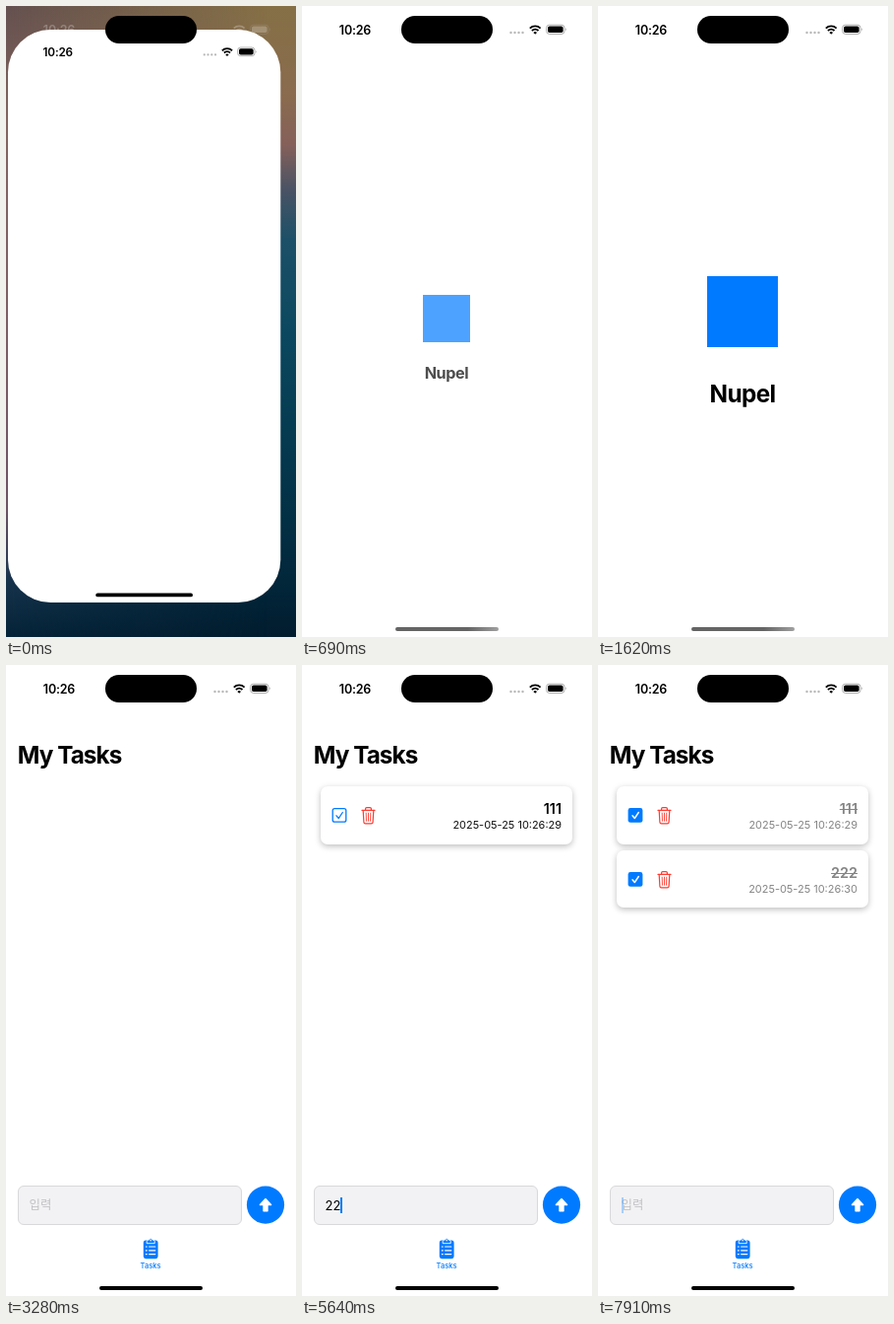
Animation, 295 px wide and 640 px high, one loop 8 s. Source, as an HTML page:

```html
<!DOCTYPE html>
<html lang="ko">
<head>
<meta charset="utf-8">
<title>My Tasks</title>
<style>
  :root { --blue: #007aff; }
  html, body { margin: 0; width: 100%; height: 100%; overflow: hidden; }
  body { position: relative; font-family: Inter, "Noto Sans CJK KR", "Noto Sans CJK", sans-serif; color: #000; }
  body *, body *::before { position: absolute; box-sizing: border-box; }
  svg { left: 0; top: 0; overflow: visible; }
  #stage { left: 0; top: 0; width: 295px; height: 640px; overflow: hidden; }

  .wall { inset: 0; background: linear-gradient(#857046, #8a6b4e 14%, #85605a 22%, #4a5364 29%, #1c5068 37%, #0b485f 52%, #04374d 72%, #02283c 90%, #021c2e); }
  .wall::before { content: ""; inset: 0; background: linear-gradient(#64504f, #83645f 18%, #7c5c64 55%, #6c5264 80%, #16334c 91%, #042338);
    mask-image: linear-gradient(to right, #000, transparent 90%); -webkit-mask-image: linear-gradient(to right, #000, transparent 90%); }
  .ghost { color: #fff; opacity: .25; }

  #app { left: 0; top: 0; width: 295px; height: 640px; background: #fff; overflow: hidden; transform-origin: 0 0; }
  #home { left: 95px; bottom: 6px; width: 105px; height: 3.7px; border-radius: 2px; }
  .island { left: 101px; top: 10px; width: 92.5px; height: 27.5px; border-radius: 14px; background: #000; }

  #splash { inset: 0; transform-origin: 147px 331px; }
  .mark { left: 111px; top: 274px; width: 72px; height: 72px; background: var(--blue); }
  .name { left: 47px; top: 378px; width: 200px; line-height: 30px; text-align: center; font-size: 24.3px; font-weight: 700; letter-spacing: -.6px; }

  #tasks { inset: 0; }
  h1 { left: 11.8px; top: 76.4px; margin: 0; font-size: 24.3px; line-height: 30px; font-weight: 700; letter-spacing: -.95px; white-space: nowrap; }

  .card { left: 19px; width: 256px; height: 58.5px; border-radius: 7px; background: #fff; box-shadow: 0 2px 6px rgba(0, 0, 0, .26); }
  .card b, .card time { right: 11px; white-space: nowrap; }
  .card b { top: 13px; font-size: 14.4px; line-height: 20px; font-weight: 600; }
  .card time { top: 32.2px; font-size: 10.95px; line-height: 15px; color: #111; }
  .card .on { display: none; }
  .done b, .done time { color: #858585; }
  .done b { text-decoration: line-through 1.4px; }
  .done .on { display: inline; }
  .done .off { display: none; }

  .field { left: 11.5px; top: 527.6px; width: 228px; height: 40px; border: 1px solid #d9d9dc; border-radius: 6px; background: #f2f2f4; font-size: 13px; line-height: 38px; }
  .field span { left: 11px; top: 0; white-space: nowrap; }
  #hint { color: #c2c2c5; font-size: 12.4px; }
  .field #typed { position: static; }
  #caret { right: -2px; top: 11.4px; width: 2px; height: 16px; background: var(--blue); }
  .tab { left: 97px; top: 604px; width: 100px; line-height: 11px; font-size: 7.5px; font-weight: 500; text-align: center; color: var(--blue); }
</style>
</head>
<body>
<div id="stage">
  <div class="wall"></div>
  <svg class="ghost" width="295" height="50"><use href="#bar"/></svg>

  <div id="app">
    <svg width="295" height="50">
      <g id="bar" fill="currentColor">
        <text x="54" y="28.5" font-size="12.5" font-weight="600" text-anchor="middle" letter-spacing="-.2">10:26</text>
        <path d="M212.5 27h12.1" stroke="#b8b8b8" stroke-width="2.4" stroke-linecap="round" stroke-dasharray="0 4"/>
        <g fill="none" stroke="currentColor" stroke-width="1.9">
          <path d="M231.8 22.6a7.7 7.7 0 0 1 10.8 0M233.9 25a4.7 4.7 0 0 1 6.6 0"/>
        </g>
        <path d="M237.2 28.8l-1.8-1.9a2.6 2.6 0 0 1 3.6 0z"/>
        <rect x="248.6" y="19.2" width="18.4" height="9.2" rx="3" fill="none" stroke="#aaa"/>
        <rect x="250" y="20.6" width="15.6" height="6.4" rx="1.8"/>
        <path d="M268 22.3q1.8 1.5 0 3z" fill="#aaa"/>
      </g>
    </svg>

    <div id="splash">
      <div class="mark"></div>
      <div class="name">Nupel</div>
    </div>

    <div id="tasks">
      <h1>My Tasks</h1>
      <div id="list"></div>
      <div class="field">
        <span id="hint">입력</span>
        <span><span id="typed"></span><i id="caret"></i></span>
      </div>
      <svg width="295" height="640">
        <g id="send">
          <circle cx="264" cy="547.6" r="19.1" fill="#007aff"/>
          <path d="M264 541.6l5.6 6h-3.6v6.2h-4v-6.2h-3.6z" fill="#fff" stroke="#fff" stroke-width="1.4" stroke-linejoin="round"/>
        </g>
        <g transform="translate(0 -.6)">
          <rect x="139.8" y="584" width="14.8" height="18.8" rx="2.4" fill="#007aff"/>
          <path d="M143.2 587.3v-2q0-1.5 1.5-1.5h.6a2 2 0 0 1 3.8 0h.6q1.5 0 1.5 1.5v2z" fill="#007aff" stroke="#fff" stroke-width=".9"/>
          <circle cx="147.2" cy="584.3" r=".8" fill="#fff"/>
          <path d="M142.3 590.6h1M142.3 594.4h1M142.3 598.2h1M145.6 590.6h6.2M145.6 594.4h6.2M145.6 598.2h6.2" stroke="#fff" stroke-width="1.2" stroke-linecap="round"/>
        </g>
      </svg>
      <div class="tab">Tasks</div>
    </div>
    <div id="home"></div>
  </div>
  <div class="island"></div>
</div>

<script>
const LOOP = 8000;
const OPENED = 560, LOGO = 560, LOGO_END = 1620, MAIN = 3280;

// Bursts of motion advance in even steps: [start, end, count]
const BURSTS = [[120, 890, 8], [1010, 1620, 7], [4900, 5430, 6], [6200, 6860, 7]];
const PRESSES = [4900, 6200];

const TASKS = [
  { text: '111', date: '2025-05-25 10:26:29', added: 5010, done: 7140 },
  { text: '222', date: '2025-05-25 10:26:30', added: 6310, done: 7780 }
];
const TYPING = [[0, ''], [4290, '11'], [4680, '111'], [5010, ''], [5640, '22'], [5880, '222'], [6310, '']];
const CARET = [[0, 0], [4110, 1], [5330, .5], [5430, 0], [5640, 1], [6750, .5], [6860, 0],
  [7140, .5], [7250, 1], [7780, .6], [7910, .3]];

const $ = id => document.getElementById(id);
const clamp = x => Math.min(1, Math.max(0, x));
const at = (track, t) => track.filter(k => k[0] <= t).pop()[1];

function snap(t) {
  const burst = BURSTS.filter(b => b[0] <= t).pop();
  if (!burst) return 0;
  const [start, end, count] = burst;
  const step = (end - start) / (count - 1);
  const n = Math.floor((t - start) / step + 1e-6);
  return start + Math.min(n, count - 1) * step;
}

function addCard(task, i) {
  const card = document.createElement('div');
  card.className = 'card';
  card.style.top = 123 + i * 64.5 + 'px';
  card.innerHTML = `
    <svg width="60" height="58" fill="none" stroke-linecap="round" stroke-linejoin="round">
      <g transform="translate(0 -.6)">
        <g class="off" stroke="#007aff" stroke-width="1.3">
          <rect x="12.2" y="23.2" width="13.6" height="13.6" rx="2"/><path d="M16 30.4l2.3 2.7 4-6"/>
        </g>
        <g class="on">
          <rect x="11.6" y="22.6" width="14.8" height="14.8" rx="2.4" fill="#007aff"/>
          <path d="M16 30.4l2.3 2.7 4-6" stroke="#fff" stroke-width="1.4"/>
        </g>
      </g>
      <g stroke="#ff3b30" stroke-width="1.2">
        <path d="M42 24.4h13M45.6 24v-1.2q0-1.2 1.2-1.2h3.4q1.2 0 1.2 1.2V24M43.2 24.6l.7 11.8q.1 1.5 1.6 1.5h6q1.5 0 1.6-1.5l.7-11.8"/>
        <path d="M46.2 27.2l.3 8M48.5 27.2v8M50.8 27.2l-.3 8" stroke-width=".9"/>
      </g>
    </svg>
    <b>${task.text}</b><time>${task.date}</time>`;
  $('list').append(card);
  task.card = card;
}

function drawWindow(t) {
  const rest = t < OPENED ? Math.exp(-t / 120) : 0;
  const app = $('app').style;
  app.transform = rest ? `translate(${2 * rest}px, ${24 * rest}px) scale(${1 - .06 * rest})` : 'none';
  app.height = 640 - 22 * rest + 'px';
  app.borderRadius = 46 * rest + 'px';
}

function drawSplash(t) {
  const grow = clamp((t - LOGO) / (LOGO_END - LOGO)) ** 2;
  const shown = clamp((t - 400) / 240);
  $('splash').style.opacity = shown * (.69 + .31 * grow);
  $('splash').style.transform = `scale(${.663 + .337 * grow})`;
}

function drawTasks(t, held) {
  for (const task of TASKS) {
    task.card.style.display = t >= task.added ? '' : 'none';
    task.card.classList.toggle('done', t >= task.done);
  }
  const text = at(TYPING, t);
  $('typed').textContent = text;
  $('hint').style.display = text ? 'none' : '';
  $('caret').style.opacity = at(CARET, t);
  const press = PRESSES.filter(p => p <= t).pop();
  $('send').style.opacity = press ? .2 + .8 * clamp((held - press) / 380) : 1;
}

function drawHome(fade) {
  const grey = level => `rgb(${level * fade}, ${level * fade}, ${level * fade})`;
  $('home').style.background = `linear-gradient(to right, ${grey(100)} 70%, ${grey(160)})`;
}

function draw(t) {
  const held = snap(t);
  const main = t >= MAIN;
  $('splash').style.display = main ? 'none' : '';
  $('tasks').style.display = main ? '' : 'none';
  drawHome(main ? 0 : clamp(held / 670));
  drawWindow(held);
  if (main) drawTasks(t, held);
  else drawSplash(held);
}

TASKS.forEach(addCard);
const begin = performance.now();
function tick() {
  draw((performance.now() - begin) % LOOP);
  requestAnimationFrame(tick);
}
tick();
</script>
</body>
</html>
```
